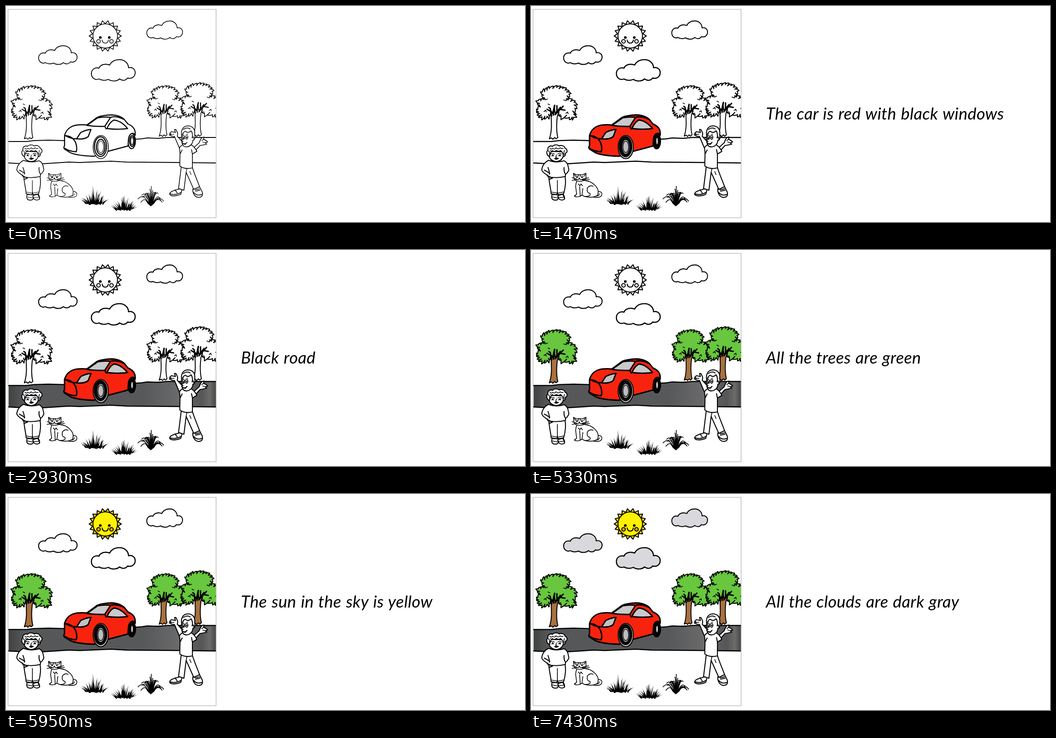
Recreate the animation shown at these times as an HTML page. Size 1161x483 px, loop 8000 ms.

```html
<!DOCTYPE html>
<html lang="en">
<head>
<meta charset="utf-8">
<title>Colouring scene</title>
<style>
  html, body { margin: 0; width: 100%; height: 100%; overflow: hidden; background: #fff; }
  svg { display: block; --w: 1.9; }
  .ink, .ink * { vector-effect: non-scaling-stroke; }
  .ink { fill: #fff; stroke: #000; stroke-width: calc(var(--w) * 1px); stroke-linejoin: round; stroke-linecap: round; }
  .bold { stroke-width: calc(var(--w) * 1.25px); }
  .slim { stroke-width: calc(var(--w) * .85px); }
  .fine { stroke-width: calc(var(--w) * .65px); }
  .line { fill: none; }
  .dot { fill: #000; stroke: none; }
  text { font: italic 37px Lato, Carlito, sans-serif; letter-spacing: .4px; word-spacing: 1.2px; }
</style>
</head>
<body>
<svg width="1161" height="483" viewBox="0 0 1161 483">
  <defs>
    <clipPath id="page"><path d="M5 8H469.5V473H5Z"/></clipPath>
    <linearGradient id="asphalt">
      <stop offset="0" stop-color="#3f4142"/><stop offset=".07" stop-color="#555758"/>
      <stop offset=".65" stop-color="#565859"/><stop offset=".82" stop-color="#6a6a6b"/>
      <stop offset=".93" stop-color="#555657"/><stop offset=".97" stop-color="#6b6b68"/>
      <stop offset="1" stop-color="#454546"/>
    </linearGradient>
    <path id="cloud" data-at="5" data-fill="#d9d8dc" d="M208 139C198 136 191 143 191 151C191 161 200 167 208 163C214 167 223 167 229 164C236 169 248 169 254 163C260 168 268 167 272 161C281 164 289 158 289 149C289 141 282 136 274 138C274 127 264 119.5 253 120C243 120 235 125 232 132C222 128 211 131 208 139Z"/>
    <g id="tree">
      <path id="crown" class="slim" data-at="3" data-fill="#68c73e"/>
      <path class="slim" data-at="3" data-fill="#a8713f" d="M41 297C47 281 46 262 45 246L43 231L48 241L52 223L54 240L66 226L59 246C57 262 56 278 60 294L56 297L53 294L49 298L46 295Z"/>
      <path class="line bold" d="M46 246L43 229L40 227M50 244L53 222M54 243L72 224M58 236L58 223M65 231L76 233M48 238L36 231"/>
      <path class="line fine" d="M26 209l5 -3 1 4 5 -2M84 210l-5 -3 0 5 -6 -2M29 236l4 -3 1 4M78 240l4 -3 1 4M38 219l4 2"/>
    </g>
  </defs>

  <path fill="none" stroke="#bfbfbf" stroke-width="1.6" d="M4.5 7.5H470V473.5H4.5Z"/>

  <g class="ink" clip-path="url(#page)">
    <path stroke="none" data-at="2" data-fill="url(#asphalt)" d="M6 303L46 303L95 300L131 301L288 298L316 296L345 294L470 294V351L417 351L270 349L235 347L140 350L78 353L6 351Z"/>
    <path class="line" d="M6 303L46 303L62 301L95 300L131 301M288 298L303 297L316 295L340 296L360 294L470 294M6 351L25 352L78 353L110 351L140 349L165 350L235 347L270 349L390 350L470 351"/>

    <use href="#tree"/>
    <use href="#tree" transform="translate(305 8.8) scale(.92 .95)"/>
    <use href="#tree" transform="translate(379.5 -7) scale(.96 1.003)"/>
    <use href="#cloud"/>
    <use href="#cloud" transform="translate(-94.7 -16.5) scale(.878)"/>
    <use href="#cloud" transform="translate(159.1 -69.4) scale(.816 .857)"/>

    <g id="sun" class="slim">
      <path id="rays" data-at="4" data-fill="#fbdc0a"/>
      <ellipse cx="222" cy="67" rx="27.5" ry="27" data-at="4" data-fill="#fff100"/>
      <g data-at="4" data-fill="#f9a21b"><circle cx="207" cy="79" r="4"/><circle cx="236" cy="79" r="4"/></g>
      <path class="line" d="M215 76Q216 83 222 83Q228 83 229 76"/>
      <g class="dot"><circle cx="211" cy="70.5" r="3"/><circle cx="231" cy="70.5" r="3"/></g>
    </g>

    <g id="car" class="bold">
      <ellipse cx="281" cy="302" rx="8.5" ry="17" data-at="1" data-fill="#111"/>
      <path data-at="1" data-fill="#f8230e" d="M131 290C134 277 144 268 160 266Q170 265 181 266L204 249Q216 244 236 243.5Q254 244 264 253L273 264Q288 270 289 283L289 289C284 281 276 285 274 297L273 313L228 325L197 336Q160 335 144 328L131 320Q128 317 131 312Z"/>
      <path data-at="1" data-fill="#c9cacb" d="M181 267L205 250Q220 247 234 249L221 269Q201 270 181 267Z"/>
      <path data-at="1" data-fill="#c9cacb" d="M226 274Q231 261 241 255Q257 256 272 274Q247 277 226 274Z"/>
      <path data-at="1" data-fill="#c2c2c2" d="M158 297L167 283Q178 277 190 276L184 292Q176 299 158 297Z"/>
      <path class="line" d="M131 290Q149 290 156 306Q160 318 157 326Q141 325 131 318M158 297Q144 297 133 290M234 249Q248 245 262 253M221 269L224 275"/>
      <ellipse class="slim" cx="212" cy="315.5" rx="17" ry="26" data-at="1" data-fill="#bdbdbd"/>
      <ellipse cx="211.5" cy="314.5" rx="13.5" ry="22" data-at="1" data-fill="#111"/>
      <ellipse cx="212" cy="315" rx="9.5" ry="17" data-at="1" data-fill="#d5d5d5"/>
      <ellipse class="fine" cx="212" cy="315" rx="6.5" ry="13" data-at="1" data-fill="#bdbdbd"/>
      <ellipse cx="282" cy="302" rx="5.5" ry="12" data-at="1" data-fill="#111"/>
      <ellipse class="slim" cx="282" cy="302" rx="3" ry="8.5" data-at="1" data-fill="#cfcfcf"/>
    </g>

    <g id="woman" class="slim">
      <path d="M47 422C45 430 48 434 53 434C60 435 62 431 60 427L75 432Q76 427 72 421Z"/>
      <path d="M60 424Q61 434 69 434Q76 433 75 429L71 421Z"/>
      <path d="M40 380C40 395 45 410 45 420L58 422L59 416L61 422L73 420C77 406 79 394 76 380Z"/>
      <path class="line fine" d="M59 390V418M45 416L57 418M62 418L73 416M42 387L50 383M48 427L58 429M62 428L73 428"/>
      <path d="M39 345C30 350 25 358 24 366C26 373 34 377 38 379V382Q58 386 77 381V377C83 372 86 366 84 363C83 354 79 348 74 346Q57 352 39 345Z"/>
      <path class="line" d="M38 361Q42 372 41 376M74 361Q73 370 77 376M36 379L48 385L40 388M30 367L42 374"/>
      <path d="M40 325C37 338 45 347 56 348C68 347 75 338 72 326Z"/>
      <path class="line" d="M45 344Q57 352 68 344"/>
      <path d="M42 336C34 335 34 325 38 322C36 315 44 311 48 314C52 309 60 310 63 313C69 310 76 314 76 318C82 320 82 328 77 329Q78 336 72 337Q73 328 66 323Q62 327 57 323Q52 327 47 324Q42 329 42 336Z"/>
      <path class="line fine" d="M44 331Q48 328 52 331M60 331Q64 328 68 331M46 335H51M61 335H67M57 333L55 339H58M42 318q4 4 7 0q4 4 7 -1q5 5 9 0q4 3 7 1M39 324q4 3 2 8M75 323q-3 5 0 10M43 323q3 3 6 0"/>
      <path class="dot" d="M51 341Q57 339 63 340Q57 347 51 341M47 332h3v3h-3zM63 332h3v3h-3z"/>
    </g>

    <g id="cat" class="fine">
      <path d="M147 416C158 411 163 423 154 427Q145 430 133 425Z"/>
      <path d="M103 391C97 402 102 412 102 421L97 425Q101 428 109 426L114 423L120 426Q136 430 148 424C157 408 136 390 119 390Z"/>
      <path class="line" d="M109 404L110 425M116 408L114 423M120 426Q135 426 132 419Q124 418 126 407Q131 400 139 403M145 425Q152 425 153 420M106 398l3 4 3 -4 3 4"/>
      <path d="M96 385L95 374L102 378Q108 376 114 378L123 374L123 385Q120 392 109 392Q98 392 96 385Z"/>
      <path class="line" d="M106 377V381M110 377V381M97 377L100 381M121 377L118 381M108 386Q105 390 102 387M108 386Q112 390 115 387M102 387L92 384M102 388L92 390M115 387L129 384M115 388L131 388M115 389L128 392"/>
      <path class="dot" d="M101 381h4v3h-4zM112 381h4v3h-4zM106 384h4l-2 3z"/>
    </g>

    <g id="boy" class="slim">
      <path d="M401 311L383 291C386 284 382 281 380 276L377 276L379 283L370 281L366 285L370 287L365 288L371 291L377 292L388 318Z"/>
      <path d="M421 316L432 306L436 297L439 294L443 293L442 298L448 301L451 304L446 306L449 309L440 311L434 312L424 323Z"/>
      <path class="line fine" d="M370 287L376 287M446 306L440 304M442 298L438 301"/>
      <path d="M387 409C380 412 368 413 366 420C367 426 380 426 391 421L394 410Z"/>
      <path d="M418 409C417 418 422 427 430 428C438 428 441 424 439 416L433 404Z"/>
      <path class="line" d="M367 420Q379 424 391 417M378 411L383 418M420 417Q427 426 439 421M423 411L433 409M424 414L434 412"/>
      <path d="M392 360L386 408L398 412L403 372L420 410L433 404C428 390 421 375 417 361Z"/>
      <path class="line fine" d="M403 372L405 362M411 370L414 377"/>
      <path d="M388 318Q390 312 398 309Q408 314 413 310Q420 312 427 325L417 331L417 362Q400 366 389 358C388 345 391 330 388 318Z"/>
      <path class="line" d="M417 331L415 321M390 330L394 322"/>
      <path d="M393 290C391 279 395 269 406 268C418 268 424 276 422 288C424 294 422 301 418 300C418 308 412 314 405 315C396 316 393 308 394 302L392 297Z"/>
      <path class="line" d="M394 289Q397 281 401 280Q407 286 414 279Q418 284 417 295M397 276Q405 270 412 275M416 294Q421 291 420 297M393 305Q399 312 405 305M398 309L402 309M395 298Q391 302 396 303"/>
      <g class="fine"><ellipse cx="397" cy="294" rx="2.5" ry="4.3"/><ellipse cx="404" cy="293.5" rx="3" ry="4.6"/></g>
      <path class="dot" d="M396 293h2v4h-2zM403 292h2.4v4h-2.4zM394 305Q399 310 404 306Q399 314 394 305M394 287l4 -1v1.5zM401 286l6 0v1.5z"/>
    </g>

    <path id="grass" class="dot"/>
    <path id="fronds" class="line fine"/>
    <path class="dot" d="M312 434L319 438L323 431L327 438L337 433L331 442L324 448L317 442Z"/>
  </g>
  <text id="caption" x="525.5" y="254"></text>
</svg>

<script>
const $ = id => document.getElementById(id);
const svg = document.querySelector('svg');
const LOOP = 8000;
const starts = [0, 1470, 2930, 4400, 5950, 7430];
const captions = ['', 'The car is red with black windows', 'Black road',
  'All the trees are green', 'The sun in the sky is yellow', 'All the clouds are dark gray'];

let seed = 11;
const rand = () => (seed = seed * 16807 % 2147483647) / 2147483647;
const pt = (x, y) => x.toFixed(1) + ' ' + y.toFixed(1);

// Leafy outline: bulges that end in hooked tips of uneven size
function leafy(points) {
  let d = 'M' + pt(...points[0]);
  points.forEach(([x, y], i) => {
    const [x2, y2] = points[(i + 1) % points.length];
    const len = Math.hypot(x2 - x, y2 - y), n = Math.max(1, Math.round(len / 7));
    const ux = (x2 - x) / len, uy = (y2 - y) / len, step = len / n;
    const at = (along, out) => pt(x + ux * along + uy * out, y + uy * along - ux * out);
    for (let k = 0; k < n; k++) {
      const end = (k + 1) * step;
      d += `Q${at(end - step * .5, 3)} ${at(end + 2, 1 + rand() * 4)}L${at(end, -1 - rand() * 3)}`;
    }
  });
  return d + 'Z';
}

function star(cx, cy, n, rx, ry, inner) {
  const corners = Array.from({length: 2 * n}, (_, i) => {
    const a = i * Math.PI / n, k = i % 2 ? inner : 1;
    return pt(cx + Math.cos(a) * rx * k, cy + Math.sin(a) * ry * k);
  });
  return 'M' + corners.join('L') + 'Z';
}

function tuft(cx, base, w, h) {
  let d = '';
  for (let i = 0; i < 38; i++) {
    const t = i / 18.5 - 1, x = cx + t * w * .6, y = base - rand() * 4;
    const tipX = cx + t * w * 1.05 + (rand() - .5) * 10;
    const tipY = y - 1 - h * (1 - Math.abs(t)) * (.3 + .7 * rand()) - 9 * rand();
    const midX = x + (tipX - x) * .35, midY = tipY + (y - tipY) * .4;
    d += `M${pt(x - 1.3, y)}Q${pt(midX - .8, midY)} ${pt(tipX, tipY)}Q${pt(midX + .8, midY)} ${pt(x + 1.3, y)}Z`;
  }
  return d;
}

function arches(cx, base, w, h) {
  let d = '';
  for (let i = 0; i < 19; i++) {
    const t = i / 9 - 1, drop = Math.abs(t);
    const reach = w * t * (.8 + rand() * .2);
    const tipY = base - h * (1 - drop) * (.7 + rand() * .3) - 22 * drop * rand();
    d += `M${pt(cx + t * 6, base - 4)}Q${pt(cx + reach * .6, tipY - 14 * drop)} ${pt(cx + reach, tipY)}`;
  }
  return d;
}

$('crown').setAttribute('d', leafy([[28, 207], [24, 193], [40, 183], [57, 180], [77, 185], [86, 196],
  [82, 208], [97, 213], [101, 228], [95, 236], [98, 248], [87, 252], [78, 247], [68, 249], [62, 240],
  [45, 240], [38, 248], [25, 250], [17, 243], [14, 232], [20, 225], [14, 213]]));
$('rays').setAttribute('d', star(222, 67, 18, 36, 34.5, .8));
$('grass').setAttribute('d', tuft(198, 445, 32, 38) + tuft(264, 458, 30, 38));
$('fronds').setAttribute('d', arches(325, 445, 31, 45));

const parts = document.querySelectorAll('[data-at]');
let shown = -1;
function draw() {
  const time = performance.now() % LOOP;
  const step = starts.findLastIndex(s => time >= s);
  if (step !== shown) {
    shown = step;
    parts.forEach(p => p.style.fill = step >= p.dataset.at ? p.dataset.fill : '#fff');
    svg.style.setProperty('--w', step ? 2.5 : 1.9);
    $('caption').textContent = captions[step];
  }
  requestAnimationFrame(draw);
}
draw();
</script>
</body>
</html>
```
